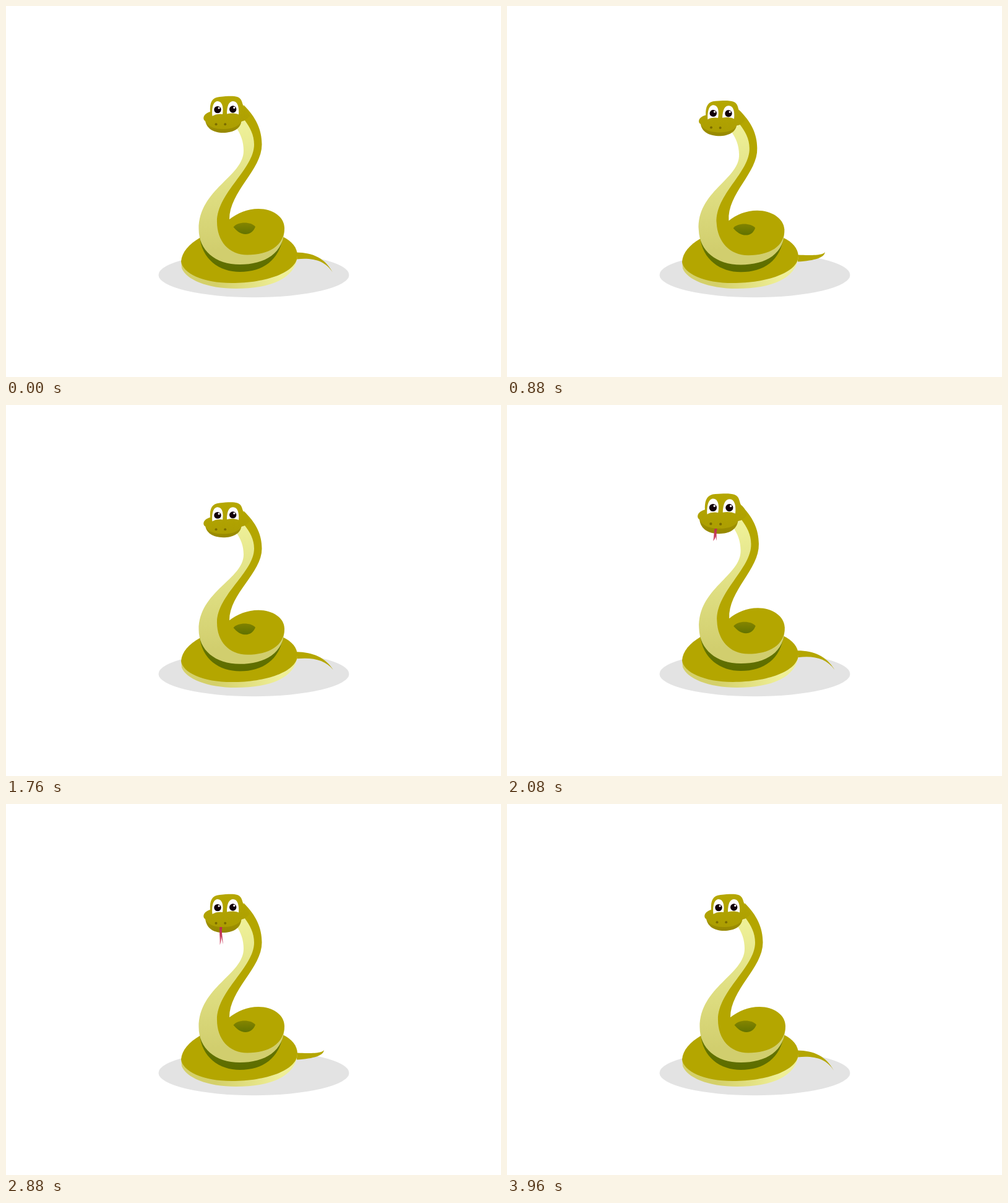
These frames come from a looping animation (800 px wide and 600 px high, 4000 ms). An HTML page with a canvas:

```html
<!DOCTYPE html>
<html lang="en">
<head>
<meta charset="utf-8">
<title>Snake</title>
<style>
html, body { margin: 0; width: 100%; height: 100%; overflow: hidden; background: #fff; }
canvas { display: block; }
</style>
</head>
<body>
<canvas id="stage" width="800" height="600"></canvas>
<script>
const ctx = document.getElementById('stage').getContext('2d');
const LOOP = 4000, STEP = 40, TAIL_PERIOD = 2000;
const OLIVE = '#b4a600';

const ease = u => (1 - Math.cos(Math.PI * Math.min(1, Math.max(0, u)))) / 2;

// Rises from 0 to 1, holds, and falls back to 0
const bump = (t, start, full, release, end) =>
  ease((t - start) / (full - start)) * ease((end - t) / (end - release));

// Eased value between [phase, value] turning points
function swing(phase, ...turns) {
  const i = turns.findIndex(turn => turn[0] > phase);
  const [p0, a] = turns[i - 1], [p1, b] = turns[i];
  return a + (b - a) * ease((phase - p0) / (p1 - p0));
}

function poseAt(t) {
  const sway = bump(t, 0, 620, 621, 1480);
  const strike = bump(t, 1800, 2240, 2420, 2860);
  const crouch = bump(t, 1480, 1760, 1761, 2240);
  const stretch = bump(t, 1760, 2240, 2241, 2440);
  return {
    lean: -11.8 * sway - 9.4 * strike,
    squash: 10.5 * sway + 12 * crouch - 2.5 * stretch,
    tilt: 2 * bump(t, 0, 900, 1160, 1480) + 2.5 * strike,
    zoom: 1 + .1 * strike,
    mouth: bump(t, 1960, 2160, 2920, 3160),
  };
}

// Bends the body: sideways lean and vertical squash grow with height
function warp(x, y, pose) {
  const h = Math.max(0, (457 - y) / 311);
  const u = Math.min(1, Math.max(0, (h - .13) / .67));
  return [x + pose.lean * u * u * (3 - 2 * u), y + pose.squash * h ** 1.3];
}

function gradient(y0, y1, ...colors) {
  const g = ctx.createLinearGradient(0, y0, 0, y1);
  colors.forEach((color, i) => g.addColorStop(i / (colors.length - 1), color));
  return g;
}

const rimColor = ctx.createLinearGradient(284, 0, 471, 0);
rimColor.addColorStop(.3, '#d4d06a');
rimColor.addColorStop(.85, '#efef98');
const bellyColor = gradient(195, 395, '#eef098', '#d1ce6e');
const shadeColor = gradient(375, 430, '#667800', '#5d6c00');
const holeColor = gradient(350, 369, '#858500', '#637300');
const headColor = gradient(146, 205, '#b5a700', '#ab9d02');
const jawColor = gradient(188, 208, '#a09200', '#958700');
const tongueColor = gradient(200, 228, '#bd2c50', '#d0506c');

function fill(color, d) {
  ctx.fillStyle = color;
  ctx.fill(new Path2D(d));
}

function oval(color, x, y, rx, ry = rx) {
  ctx.fillStyle = color;
  ctx.beginPath();
  ctx.ellipse(x, y, rx, ry, 0, 0, 2 * Math.PI);
  ctx.fill();
}

// The root swings, the tip trails behind it
function drawTail(t) {
  const phase = t % TAIL_PERIOD / TAIL_PERIOD;
  const rootY = swing(phase, [0, 404], [.21, 390], [.5, 410], [1, 404]);
  const tipX = swing(phase, [0, 528], [.16, 539], [.49, 512], [.86, 529], [1, 528]);
  const tipY = swing(phase, [0, 431], [.25, 390], [1, 431]);
  const lift = ((410 - rootY) / 20) ** 2;
  const rootX = 470 - 5 * lift, bendX = 497 - 7 * lift, bendY = rootY - 13 * lift;
  const curlY = bendY + .28 * (tipY - bendY) - 8 * lift;
  const angle = Math.atan2(bendY - rootY, bendX - rootX);
  const off = (x, y, w) => `${x - w * Math.sin(angle)},${y + w * Math.cos(angle)}`;
  fill(OLIVE, `M${off(rootX, rootY, -5.5)} C${off(bendX, bendY, -4)} ${off(516, curlY, -2)} ${tipX},${tipY}
    C${off(516, curlY, 2)} ${off(bendX, bendY, 4)} ${off(rootX, rootY, 5.5)}Z`);
}

function drawBody(pose) {
  const bent = (color, d) =>
    fill(color, d.replace(/([\d.]+),([\d.]+)/g, (_, x, y) => warp(+x, +y, pose).join()));
  // Lowest coil
  bent(rimColor, 'M283,412 L284,424 C291,442 324,457 372,457 C427,457 468,441 471,404Z');
  bent(OLIVE, 'M283,413 C284,398 296,385 313,375 L447,373 C462,380 471,391 471,404 C470,431 420,448 365,448 C318,448 285,432 283,413Z');
  bent(shadeColor, 'M313,372 C316,410 345,430 378,430 C415,430 442,411 448,372Z');
  // Belly, reaching a little under the back
  bent(bellyColor, `M370,194 C380,207 384,220 384,234 C384,276 311.5,296 311.5,361
    C311.5,395 338,418 378,418 C418,418 450,400 450,359 L380,370 L345,349
    C345,302 405,264 405,224 C405,208 398,196 388,183Z`);
  // Back of the neck and upper coil
  bent(OLIVE, `M384,160 C404,180 413.5,200 413.5,224 C413.5,265 361,300 361,345
    C374,335 390,328 408,328 C431,328 450,341 450,359 C450,388 424,402.5 390,402.5
    C360,402.5 341,380 341,349 C341,302 401,264 401,224 C401,208 394,196 386,185Z`);
  bent(holeColor, 'M367.5,357.5 C374,348.5 396,348 403,357 C400,365 394,369 387,369 C379,369 373,364 367.5,357.5Z');
}

function drawTongue(t, amount) {
  const s = 3.5 * Math.sin((t - 2880) / 1000 * 2 * Math.PI * 2.6);
  ctx.save();
  ctx.translate(0, 200 * (1 - amount));
  ctx.scale(1, amount);
  fill(tongueColor, `M345.3,199 L349.3,199 C348,210 ${350.5 + s},216 ${350.8 + s},227
    C${349.6 + s},222 ${348.8 + s},218 ${347.7 + s / 2},214 C348,219 ${347 + s},225 ${345.5 + s},228
    C${346.5 + s},219 344.5,210 345.3,199Z`);
  ctx.restore();
}

function drawEye(outline, x, y) {
  fill('#fff', outline);
  oval('#12000a', x, y, 5.7);
  oval('#fff', x + 2.1, y - 2.6, 1.6);
}

function drawHead(t, pose) {
  const { tilt, zoom, mouth, squash } = pose;
  const chin = 205 + 3 * mouth;
  ctx.save();
  ctx.translate(...warp(385, 185, pose));
  ctx.rotate(tilt * Math.PI / 180);
  ctx.scale(zoom, zoom * (1 - squash / 300));
  ctx.translate(-385, -185);
  fill(jawColor, `M322,184 C323,${chin - 8} 334,${chin} 351,${chin} C366,${chin} 379,${chin - 6} 380.5,186Z`);
  fill(headColor, `M330,171 C329,156 333,148 345,147 C358,145.5 368,145 374,147 C382,150 381,157 384,162
    C390,166 392,172 394,178 L386,185 L380.5,187 C376,195 365,199 351,199 C338,199 327,196 322,186 C318,184 317,175 330,171Z`);
  drawEye('M333.5,178 C332,160 337,154 342,154 C349,154 352,163 350,175 C344,174 338,175 333.5,178Z', 342, 167.6);
  drawEye('M357,174.5 C357,160 361,154 367,154 C374,154 377,163 376,175.5 C370,173 363,173 357,174.5Z', 366.7, 167);
  for (const x of [339.5, 354.2]) oval('#7b6d00', x, 191.3 + 1.5 * mouth, 2);
  if (mouth > 0) drawTongue(t, mouth);
  ctx.restore();
}

// Three short strokes shooting away from the mouth
function drawHiss(t) {
  const p = (t - 2240) / 200;
  if (p <= 0 || p >= 1) return;
  const front = 39 + 46 * (1 - (1 - p) ** 2), back = 39 + 46 * p ** .6;
  ctx.strokeStyle = '#333';
  ctx.lineWidth = 3;
  ctx.lineCap = 'round';
  for (const angle of [0, .37, .7]) {
    const dx = -Math.sin(angle), dy = Math.cos(angle);
    ctx.beginPath();
    ctx.moveTo(337 + dx * back, 193 + dy * back);
    ctx.lineTo(337 + dx * front, 193 + dy * front);
    ctx.stroke();
  }
}

function draw(t) {
  const pose = poseAt(t);
  ctx.fillStyle = '#fff';
  ctx.fillRect(0, 0, 800, 600);
  oval('#e3e3e3', 400.5, 434.9, 154, 36.3);
  drawTail(t);
  drawBody(pose);
  drawHead(t, pose);
  drawHiss(t);
}

let start;
function tick(now) {
  start ??= now;
  draw(Math.floor(Math.max(0, now - start) / STEP) * STEP % LOOP);
  requestAnimationFrame(tick);
}
draw(0);
requestAnimationFrame(tick);
</script>
</body>
</html>
```
